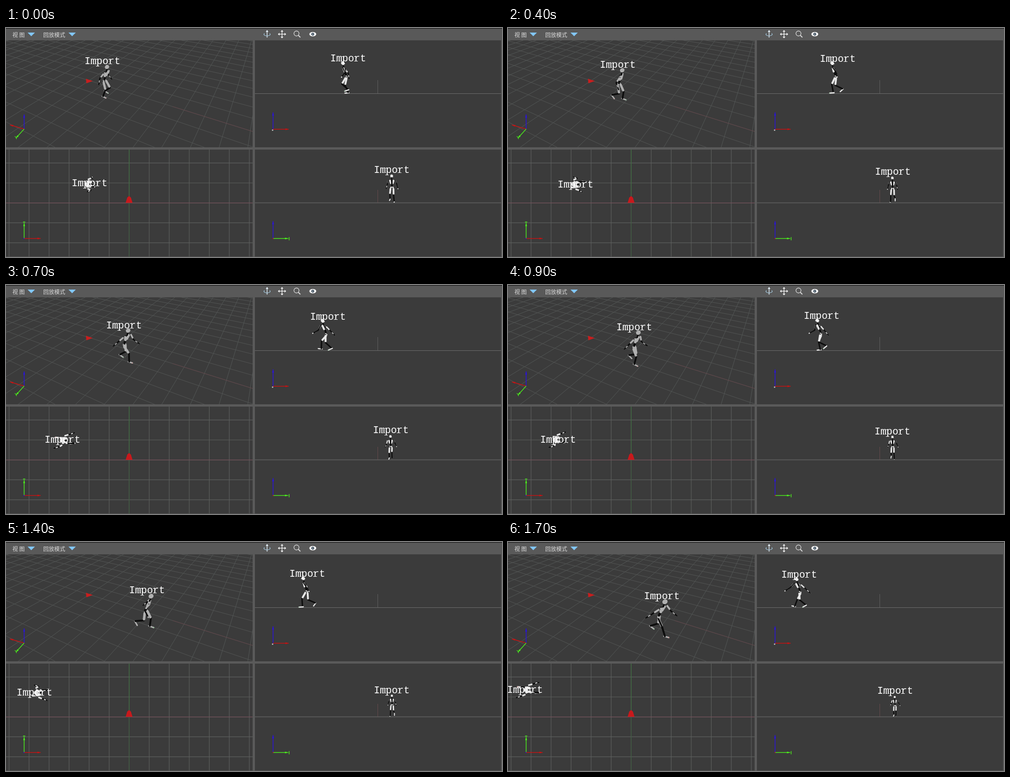
An HTML page with a canvas that plays this animation: 1080x501 px, repeating every 1.8 s.

```html
<!DOCTYPE html>
<html lang="zh">
<head>
<meta charset="utf-8">
<title>Viewports</title>
<style>
  html, body { margin: 0; width: 100%; height: 100%; overflow: hidden; background: #3b3b3b; }
  canvas { position: absolute; left: 0; top: 0; }
  .menu { position: absolute; top: 6px; color: #dcdcdc; white-space: pre;
    font: 12px/17px "Noto Sans CJK SC", "Noto Sans CJK", sans-serif; }
</style>
</head>
<body>
<canvas id="scene" width="1080" height="501"></canvas>
<canvas id="actor" width="1080" height="501"></canvas>
<span class="menu" style="left:14px">视 图</span>
<span class="menu" style="left:81px">回放模式</span>
<script>
const bg = document.getElementById('scene').getContext('2d');
const fg = document.getElementById('actor').getContext('2d');
const { sin, cos, abs, max, PI, sqrt, round } = Math;
const mix = (a, b, k) => a + (b - a) * k;

// World unit is one grid cell; the walker heads along -x, z is up.
function orbit([x, y, z]) {
  const right = -0.866 * x - 0.5 * y, away = 0.5 * x - 0.866 * y;
  const depth = 13.27 + 0.838 * away - 0.545 * z;
  const s = 470 / depth;
  return [268 + (right - 2.456) * s, 144 - (0.819 + 0.545 * away + 0.838 * z) * s, s, depth];
}
function side([x, y, z]) {
  const s = 298 / (7.3 + y);
  return [810 + x * s, 143.5 - z * s, s, y];
}
function plan([x, y, z]) {
  return [268 + x * 43.6, 382.5 - y * 43.6, 43.6, -z];
}
function front([x, y, z]) {
  const s = 298 / (7.3 - x);
  return [810 + y * s, 382 - z * s, s, -x];
}

const times = [0, 400, 700, 900, 1200, 1400, 1700];
const path = {
  x: [-1.9, -2.66, -3.13, -3.59, -4.03, -4.43, -5.05],
  y: [.94, .92, .97, 1.01, 1.12, 1.21, 1.35]
};
const views = [
  { box: [0, 27, 537, 234], cam: orbit, tone: '#b0b0b0',
    lx: [172, 201, 219, 237, 253, 269, 297], ly: [72, 80, 88, 92, 98, 105, 118] },
  { box: [542, 27, 536, 234], cam: side, tone: '#e8e8e8',
    lx: [707, 680, 663, 645, 632, 618, 596], ly: [66, 67, 69, 67, 68, 69, 71] },
  { box: [0, 266, 537, 234], cam: plan, tone: '#e2e2e2',
    lx: [144, 109, 85, 71, 42, 24, -1], ly: [339, 342, 338, 338, 332, 329, 323] },
  { box: [542, 266, 536, 234], cam: front, tone: '#e8e8e8',
    lx: [802, 800, 800, 799, 802, 802, 805], ly: [310, 314, 317, 320, 322, 324, 325] }
];

function at(vals, t) {
  let i = 0;
  while (i < times.length - 2 && t > times[i + 1]) i++;
  return mix(vals[i], vals[i + 1], (t - times[i]) / (times[i + 1] - times[i]));
}

function line(c, color, width, ...pts) {
  c.strokeStyle = color;
  c.lineWidth = width;
  c.beginPath();
  for (let i = 0; i < pts.length; i += 2) c.lineTo(pts[i], pts[i + 1]);
  c.stroke();
}
function shape(c, color, ...pts) {
  c.fillStyle = color;
  c.beginPath();
  for (let i = 0; i < pts.length; i += 2) c.lineTo(pts[i], pts[i + 1]);
  c.fill();
}
function rect(c, color, x, y, w, h) {
  c.fillStyle = color;
  c.fillRect(x, y, w, h);
}
function inBox(c, box, draw) {
  c.save();
  c.beginPath();
  c.rect(...box);
  c.clip();
  draw();
  c.restore();
}

// ---- still scene ----
function floorGrid() {
  const seg = (a, b, color) => {
    const p = orbit(a), q = orbit(b);
    line(bg, color, 1, p[0], p[1], q[0], q[1]);
  };
  for (let u = -16; u <= 12; u++) seg([-u, -16, 0], [-u, 8, 0], '#535756');
  for (let v = -16; v <= 8; v++) seg([16, v, 0], [-12, v, 0], '#535554');
  seg([-5.4, 0, 0], [-12, 0, 0], '#63454a');
  shape(bg, '#c81e1e', 174, 111, 189, 116, 175, 121);
}
function planGrid() {
  for (let i = -6; i <= 6; i++) line(bg, '#5c5e5d', 1.2, 268.2 + i * 43.6, 266, 268.2 + i * 43.6, 500);
  for (let i = -2; i <= 2; i++) line(bg, '#5e605f', 1.2, 0, 382.6 + i * 43.6, 537, 382.6 + i * 43.6);
  line(bg, '#75505a', 1.2, 0, 382.6, 537, 382.6);
  line(bg, '#3d713f', 1.2, 268.4, 266, 268.4, 382);
  line(bg, '#3e5c40', 1.2, 268.4, 383, 268.4, 500);
  shape(bg, '#c8191c', 260.5, 382.5, 264, 371, 268, 367.5, 272, 371, 275.5, 382.5);
}
function arrow(color, x, y, dx, dy) {
  const n = Math.hypot(dx, dy), ux = dx / n, uy = dy / n, ex = x + dx, ey = y + dy;
  line(bg, color, 1.5, x, y, ex, ey);
  shape(bg, color, ex, ey, ex - 7 * ux - 2 * uy, ey - 7 * uy + 2 * ux,
    ex - 7 * ux + 2 * uy, ey - 7 * uy - 2 * ux);
}
function toolbar() {
  rect(bg, '#595959', 0, 0, 1080, 27);
  rect(bg, '#242424', 0, 0, 1080, 1.5);
  for (const x of [55, 144]) shape(bg, '#82c6f6', x - 8, 10, x + 8, 10, x, 18);
  // orbit
  line(bg, '#e8f4fc', 1.4, 568.5, 5, 568.5, 21);
  shape(bg, '#e8f4fc', 565.5, 8.5, 568.5, 4.5, 571.5, 8.5);
  bg.strokeStyle = '#a9cfe6';
  bg.lineWidth = 1.2;
  bg.beginPath();
  bg.ellipse(568.5, 14, 7, 3, 0, -0.7, PI + 0.7);
  bg.stroke();
  // pan
  line(bg, '#f4f4f4', 1.4, 593, 13.5, 609, 13.5);
  line(bg, '#f4f4f4', 1.4, 601, 5.5, 601, 21.5);
  for (let i = 0; i < 4; i++) {
    bg.save();
    bg.translate(601, 13.5);
    bg.rotate(i * PI / 2);
    shape(bg, '#f4f4f4', 9, 0, 5.5, -3, 5.5, 3);
    bg.restore();
  }
  // zoom
  bg.strokeStyle = '#dedede';
  bg.lineWidth = 1.3;
  bg.beginPath();
  bg.arc(632.5, 12, 5.5, 0, 2 * PI);
  bg.stroke();
  line(bg, '#dedede', 1.8, 636.5, 16, 641, 20.5);
  // eye
  bg.fillStyle = '#f8f8f8';
  bg.beginPath();
  bg.ellipse(668, 13.5, 7.5, 4.8, 0, 0, 2 * PI);
  bg.fill();
  bg.fillStyle = '#263a4c';
  bg.beginPath();
  bg.arc(668, 13.5, 3, 0, 2 * PI);
  bg.fill();
  rect(bg, '#f8f8f8', 667, 12.5, 2, 2);
}
function drawScene() {
  const red = '#c81212', green = '#4cf01c', blue = '#2a12e0';
  rect(bg, '#5a5a5a', 0, 0, 1080, 501);
  for (const v of views) rect(bg, '#3b3b3b', ...v.box);
  inBox(bg, views[0].box, floorGrid);
  inBox(bg, views[2].box, planGrid);
  line(bg, '#6e6e6e', 1.2, 542, 143.5, 1078, 143.5);
  line(bg, '#606060', 1, 809.5, 114, 809.5, 143);
  line(bg, '#626262', 1.4, 542, 382.5, 1078, 382.5);
  line(bg, '#654a4c', 1, 809.5, 354, 809.5, 382);

  arrow(blue, 39.5, 221, 0, -32);
  arrow(red, 39.5, 221, -31, -9);
  arrow(green, 39.5, 221, -18, 20);
  line(bg, green, 1.2, 19, 237, 22, 239, 23, 243);
  arrow(blue, 581.5, 221.5, 0, -37);
  arrow(red, 581.5, 221.5, 34, 0);
  rect(bg, '#a8a8a8', 579, 222, 3, 3);
  arrow(green, 39.5, 460.5, 0, -34);
  line(bg, green, 1.6, 37, 424.5, 42, 424.5);
  arrow(red, 39.5, 460.5, 36, 0);
  rect(bg, blue, 38, 459.5, 2, 2);
  arrow(blue, 581.5, 460.5, 0, -38);
  arrow(green, 581.5, 460.5, 33, 0);
  line(bg, green, 1.4, 616.5, 457.5, 616.5, 464.5);
  rect(bg, red, 580.5, 459.5, 2, 2);
  toolbar();
}

// ---- walker ----
const STRIDE = 0.93;
const plant = k => -1.83 - STRIDE * k;

function ankle(g, odd) {
  const k = round(g), d = g - k;
  if (abs(k % 2) === odd) {
    const tilt = max(0, d - .15) / .35 * .6 - max(0, -.2 - d) / .3 * .35;
    return { x: plant(k), z: .07 + .2 * max(0, sin(tilt)), tilt };
  }
  const s = d + .5;
  return {
    x: mix(plant(k - 1), plant(k + 1), s * s * (2 - s)),
    z: .07 + .11 * (1 - s) + .16 * sin(PI * s ** .7),
    tilt: .9 * sin(PI * s ** .6) * (1 - s) + .6 * (1 - s) - .35 * s
  };
}
// Middle joint of a two-bone limb; dir 1 bends forward, -1 backward.
function joint(a, b, len, dir) {
  const dx = b[0] - a[0], dz = b[2] - a[2], d = Math.hypot(dx, dz) || 1;
  const off = dir * sqrt(max(0, len * len - d * d / 4));
  return [(a[0] + b[0]) / 2 + dz / d * off, (a[1] + b[1]) / 2, (a[2] + b[2]) / 2 - dx / d * off];
}
const between = (a, b, k) => a.map((v, i) => mix(v, b[i], k));

function buildBody(t, tone) {
  const x = at(path.x, t), y = at(path.y, t);
  const g = (-1.83 - x) / STRIDE, hz = .975 + .02 * cos(2 * PI * g);
  const swing = cos(PI * (g - 1.6)), dark = '#0c0c0c';
  const parts = [];
  const bone = (a, b, w, color = tone) => parts.push({ a, b, w, color });

  for (const q of [-1, 1]) {
    const left = q < 0;
    const f = ankle(g, left ? 1 : 0);
    const hip = [x, y + q * .1, hz], ank = [f.x, y + q * .14, f.z];
    const knee = joint(hip, ank, .485, 1);
    const cx = cos(f.tilt), cz = sin(f.tilt);
    const heel = [f.x + .05 * cx, ank[1], f.z - .02];
    const toe = [f.x - .2 * cx, ank[1] + q * .02, max(.03, f.z - .04 - .2 * cz)];
    bone(hip, knee, .07, dark);
    bone(between(hip, knee, .15), between(hip, knee, .85), .115);
    bone(knee, ank, .085, dark);
    bone(heel, toe, .07);
    bone(toe, toe, .04, left ? '#7fd08a' : '#e08a8a');

    const reach = left ? .15 + .6 * swing : -.05 - .45 * swing;
    const sh = [x - .16 + q * .08 * swing, y + q * .23, hz + .55];
    const hand = [x - reach, y + q * .39, hz - .09 + .2 * abs(reach)];
    const elbow = joint(sh, hand, .345, -1);
    bone(sh, elbow, .06, dark);
    bone(between(sh, elbow, .1), between(sh, elbow, .65), .08);
    bone(elbow, hand, .06, dark);
    bone(between(elbow, hand, .35), between(elbow, hand, .6), .045);
    bone(between(elbow, hand, .93), hand, .06);

    bone([x - .15 + q * .03 * swing, y + q * .12, hz + .52], [x - .1, y + q * .07, hz + .33], .115);
    bone([x, y + q * .05, hz + .05], [x, y + q * .08, hz + .01], .09);
  }
  bone([x - .13, y, hz + .5], [x, y, hz + .06], .1, dark);
  bone([x - .06, y, hz + .52], [x - .04, y, hz + .38], .045, dark);
  bone([x - .16, y, hz + .58], [x - .2, y, hz + .73], .07, dark);
  bone([x - .2, y, hz + .83], [x - .23, y, hz + .86], .19);
  return parts;
}

function drawBody(v, t) {
  const list = buildBody(t, v.tone).map(p => {
    const a = v.cam(p.a), b = v.cam(p.b);
    return { a, b, w: max(1.2, p.w * (a[2] + b[2]) / 2), color: p.color, depth: a[3] + b[3] };
  });
  list.sort((m, n) => n.depth - m.depth);
  for (const p of list) line(fg, p.color, p.w, p.a[0], p.a[1], p.b[0] + .01, p.b[1]);
}

// Small slabs give the label its typewriter look: x, y, width.
const slabs = [[13, -1, 3], [18, -1, 4], [23, -1, 3], [25, -11, 3], [25, 4, 7], [52, -11, 3], [52, -1, 8]];
function drawLabel(x, y) {
  fg.fillStyle = '#fff';
  fg.fillText('Import', x, y);
  for (const [dx, dy, w] of slabs) fg.fillRect(x + dx, y + dy, w, 1);
}

function drawActor(t) {
  fg.clearRect(0, 0, 1080, 501);
  for (const v of views) {
    inBox(fg, v.box, () => {
      drawBody(v, t);
      drawLabel(round(at(v.lx, t)) - 1, round(at(v.ly, t)) + 7);
    });
  }
}

fg.lineCap = 'round';
fg.font = '21.67px "Liberation Mono", "Courier New", monospace';
drawScene();

const start = performance.now();
let shown = -1;
function tick() {
  const step = Math.floor(max(0, performance.now() - start) / 100) % 18;
  if (step !== shown) drawActor((shown = step) * 100);
  requestAnimationFrame(tick);
}
tick();
</script>
</body>
</html>
```
